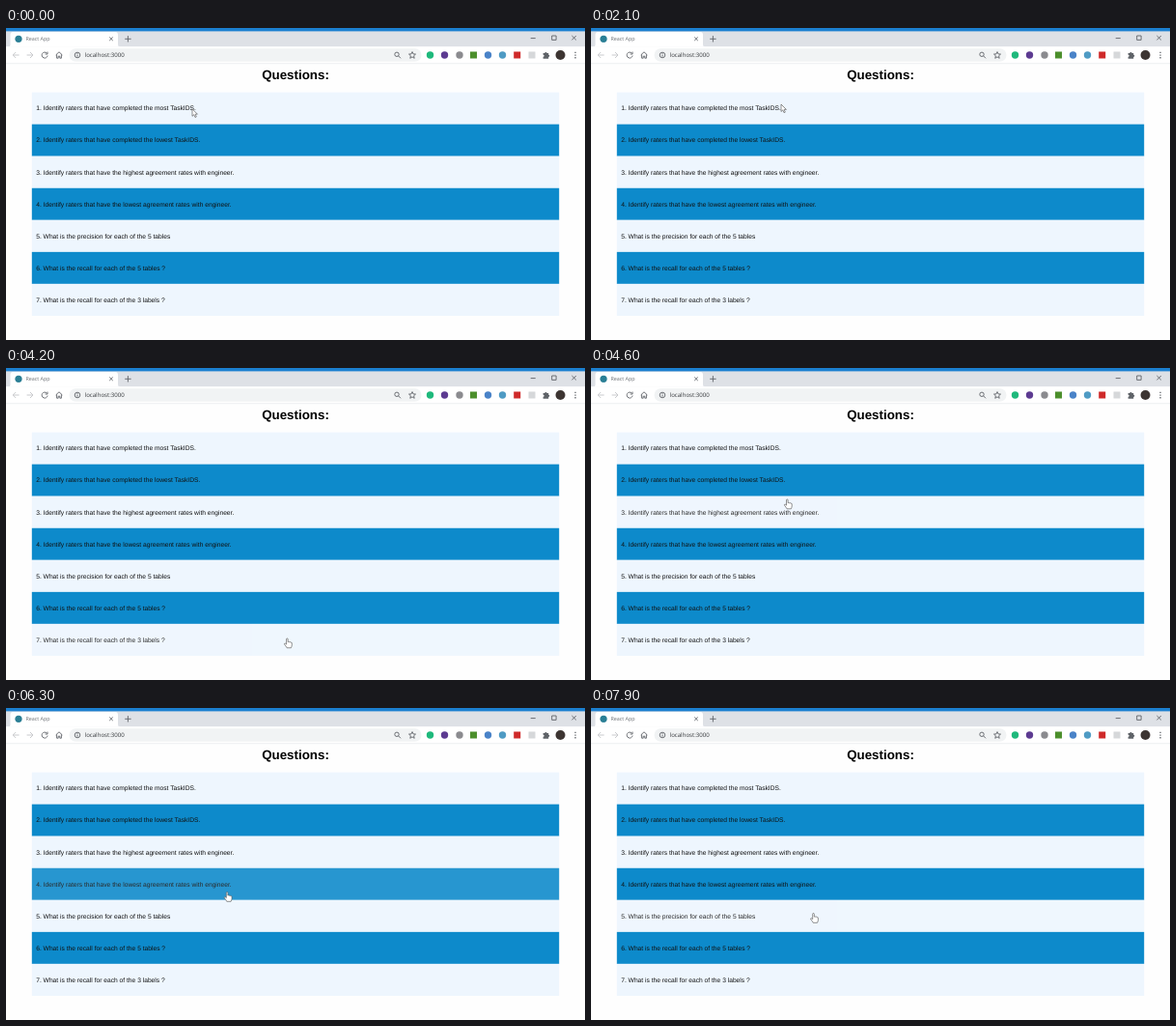
An HTML page for the animation above (8000 ms loop, 600 by 323 pixels).

```html
<!DOCTYPE html>
<html lang="en">
<head>
<meta charset="utf-8">
<title>Questions</title>
<style>
  html, body { margin: 0; width: 100%; height: 100%; overflow: hidden; background: #fff; }
  svg { display: block; width: 100vw; height: 100vh; }
  text { text-rendering: geometricPrecision; }
  .arial { font-family: "Liberation Sans", Arial, sans-serif; }
  .sans { font-family: "Open Sans", "Noto Sans", sans-serif; }
  .line { fill: none; stroke: #5f6368; stroke-width: .9; }
  .pale { stroke: #c4c6c9; }
  .mid { text-anchor: middle; }
</style>
</head>
<body>
<svg id="stage" viewBox="0 0 600 323">
  <rect width="600" height="323" fill="#fefefe"/>

  <g id="browser">
    <rect width="600" height="19.5" fill="#dee1e6"/>
    <rect width="600" height="3.4" fill="#1c80d0"/>
    <path d="M2 19.5Q4.5 19.5 4.5 17V7Q4.5 4 7.5 4H113Q116 4 116 7V17Q116 19.5 118.5 19.5Z" fill="#fff"/>
    <rect y="19.3" width="600" height="17.2" fill="#fff"/>
    <path d="M0 36.7H600" stroke="#e3e5e8" stroke-width=".6"/>
    <circle cx="13" cy="11.3" r="3.6" fill="#2b7f95"/>
    <text class="sans" x="20.4" y="13.3" font-size="5.4" fill="#6c7075">React App</text>
    <path class="line" d="M107.2 9.5l3.6 3.6m0-3.6l-3.6 3.6M123.2 11.3h6.4m-3.2-3.2v6.4"/>
    <path class="line" stroke-width=".8" d="M543.7 10.6h5M565.7 8h4.4v4.4h-4.4zM586.4 8l4.4 4.4m0-4.4l-4.4 4.4"/>
    <path class="line pale" d="M13.6 28H7.2m3-3l-3 3 3 3M21.6 28h6.4m-3-3l3 3-3 3"/>
    <path class="line" d="M42.3 26a3 3 0 1 0 .8 2.6M43 24.6v2.4h-2.4M51.6 28l3.4-3.2 3.4 3.2M52.6 27.4v3.8h1.6v-2h1.6v2h1.6v-3.8"/>
    <rect x="65.5" y="21.3" width="365" height="13.4" rx="6.7" fill="#f1f3f4"/>
    <circle class="line" cx="74" cy="28" r="2.8" stroke-width=".7"/>
    <path class="line" d="M74 27.6v2M74 26v.8"/>
    <text class="sans" x="81.6" y="30.2" font-size="6.1" fill="#34373b">localhost:3000</text>
    <circle class="line" cx="405" cy="27.3" r="2.2"/>
    <path class="line" d="M406.6 28.9l2.4 2.4"/>
    <path class="line" stroke-width=".7" d="M421 24.6l1 2.3 2.5.2-1.9 1.7.6 2.5-2.2-1.4-2.2 1.4.6-2.5-1.9-1.7 2.5-.2z"/>
    <g id="extensions"></g>
    <path d="M556.6 26h1.7a1.1 1.1 0 0 1 2.2 0h1.7v1.7a1.1 1.1 0 0 1 0 2.2v1.8h-5.6v-1.8a1.1 1.1 0 0 0 0-2.2z" fill="#5f6368"/>
    <circle cx="574.5" cy="28" r="5" fill="#3d3532"/>
    <path d="M590 24.7v1.3m0 1.4v1.3m0 1.4v1.3" stroke="#5f6368" stroke-width="1.3"/>
  </g>

  <g id="questions">
    <text class="arial mid" x="300" y="52.9" font-size="13.35" font-weight="700">Questions:</text>
    <g id="rows"></g>
  </g>

  <g id="answer">
    <text id="title" class="sans mid" x="300.3" y="60" font-size="12.62" font-weight="700"></text>
    <text id="label" class="sans mid" x="300" y="80.7" font-size="7.45" fill="#111"></text>
    <g id="chart"></g>
    <path d="M155.5 216.3H480" stroke="#efefef" stroke-width=".7"/>
    <g id="back">
      <rect x="281.2" y="290" width="37.7" height="15.2" rx="2.2" fill="#0d8acb"/>
      <text class="arial mid" x="300" y="299.6" font-size="5.7" fill="#fff">Back</text>
    </g>
  </g>

  <g id="cursor" fill="#fff" stroke="#555" stroke-width=".65" stroke-linejoin="round">
    <path id="arrow" d="M0 0V7.5L1.8 5.9 3 8.7 4.3 8.1 3.1 5.4H5.4Z"/>
    <path id="hand" d="M-1 .8Q-1 0-.2 0 .6 0 .6.8V3.6Q1.5 3 2.1 3.8 3 3.3 3.5 4.2 4.7 3.8 4.7 5V7Q4.6 8.3 3.8 9.8H-.5Q-1.2 8.3-2.9 6.3-3.5 5.2-2.5 5.1-1.7 5.2-1 6.1Z"/>
  </g>
</svg>
<script>
const LOOP = 8000;
const byId = id => document.getElementById(id);
const TOP = 66.6, ROW = 33.05;

const questions = [
  "Identify raters that have completed the most TaskIDS.",
  "Identify raters that have completed the lowest TaskIDS.",
  "Identify raters that have the highest agreement rates with engineer.",
  "Identify raters that have the lowest agreement rates with engineer.",
  "What is the precision for each of the 5 tables",
  "What is the recall for each of the 5 tables ?",
  "What is the recall for each of the 3 labels ?"
];

// Answer pages: [opened, closed, question number]
const visits = [[2500, 4050, 1], [4900, 5950, 2], [6700, 7500, 3]];

// Pointer path: [time, x, y]
const path = [
  [0, 193, 83.8], [1000, 193, 83.8], [2100, 197, 79], [2650, 197, 79],
  [3400, 353, 317], [3650, 345, 316], [3900, 304, 298], [4100, 302, 297],
  [4600, 203.5, 136], [4800, 206, 117], [5250, 206, 117], [5650, 300, 310],
  [5820, 303, 298], [5980, 302, 297], [6300, 229.3, 190.5], [6550, 230, 152],
  [6800, 230, 152], [7200, 302, 311], [7380, 302, 298], [7530, 301, 297],
  [7900, 230.7, 212.5], [8000, 230.7, 212.5]
];

function add(parent, tag, attrs, content = "") {
  const node = document.createElementNS("http://www.w3.org/2000/svg", tag);
  for (const key in attrs) node.setAttribute(key, attrs[key]);
  node.textContent = content;
  return parent.appendChild(node);
}

function buildExtensions() {
  const dot = (cx, fill) => add(byId("extensions"), "circle", { cx, cy: 28, r: 3.7, fill });
  const box = (x, fill) => add(byId("extensions"), "rect", { x: x - 3.5, y: 24.5, width: 7, height: 7, fill });
  dot(439.5, "#1fb97c");
  dot(454.5, "#5d3b91");
  dot(470, "#8b8b8f");
  box(484.5, "#4c8f2c");
  dot(499.5, "#4a83c8");
  dot(514.5, "#4f9bc4");
  box(529.7, "#cf2a2a");
  box(545, "#d6d8da");
}

function buildRows() {
  return questions.map((question, i) => {
    const row = add(byId("rows"), "g", {});
    const y = TOP + i * ROW;
    add(row, "rect", { x: 26.8, y, width: 546.4, height: ROW, fill: i % 2 ? "#0d8acb" : "#eef6fe" });
    add(row, "text", { class: "arial", x: 31.2, y: y + 18.8, "font-size": 6.68, fill: "#111" }, `${i + 1}. ${question}`);
    return row;
  });
}

// The chart is a picture shown narrower than drawn, so its lettering is condensed.
function buildChart() {
  const chart = byId("chart");
  const write = (content, x, y, size, anchor, weight, fill) => add(chart, "text", {
    class: "sans", transform: `translate(${x} ${y}) scale(.55 1)`, "font-size": size,
    "text-anchor": anchor, "font-weight": weight, fill
  }, content);
  write("Rater", 153.3, 122.2, 14.2, "end", 600, "#333");
  [..."ABCED"].forEach((name, i) => {
    const y = 129.1 + i * 17.87;
    const width = [300.4, 303.5, 306.6, 307, 308.4][i];
    write(name, 153.2, y + 12.1, 15, "end", 300, "#666");
    add(chart, "rect", { x: 155.8, y, width, height: 13.3, fill: "#4d79a6" });
  });
  for (let i = 0; i <= 10; i++)
    write(i * 200, i ? 155.8 + i * 30.5 : 158.5, 239.6, 15, "middle", 300, "#666");
  write("Completed Task IDs", 317.5, 267.8, 13.6, "middle", 600, "#333");
}

function pointerAt(t) {
  const i = Math.max(1, path.findIndex(point => point[0] > t));
  const [t0, x0, y0] = path[i - 1], [t1, x1, y1] = path[i];
  const p = (t - t0) / (t1 - t0), e = p * p * (3 - 2 * p);
  return [x0 + (x1 - x0) * e, y0 + (y1 - y0) * e];
}

const show = (node, on) => node.setAttribute("display", on ? "inline" : "none");

function render(t) {
  const [x, y] = pointerAt(t);
  const visit = visits.find(([from, to]) => t >= from && t < to);
  const row = !visit && t > 2200 ? Math.floor((y - TOP) / ROW) : -1;
  const onRow = row >= 0 && row < rows.length;
  const onBack = !!visit && x > 281 && x < 319 && y > 290 && y < 305;
  show(byId("questions"), !visit);
  show(byId("answer"), visit);
  if (visit) {
    byId("title").textContent = `${visit[2]}.${questions[visit[2] - 1]}`;
    byId("label").textContent = `Answer${visit[2]}`;
  }
  rows.forEach((node, i) => node.setAttribute("opacity", i === row ? .89 : 1));
  byId("back").setAttribute("opacity", onBack ? .89 : 1);
  byId("cursor").setAttribute("transform", `translate(${x} ${y})`);
  show(byId("hand"), onRow || onBack);
  show(byId("arrow"), !onRow && !onBack);
}

buildExtensions();
buildChart();
const rows = buildRows();
const start = performance.now();
function tick() {
  render((performance.now() - start) % LOOP);
  requestAnimationFrame(tick);
}
tick();
</script>
</body>
</html>
```
